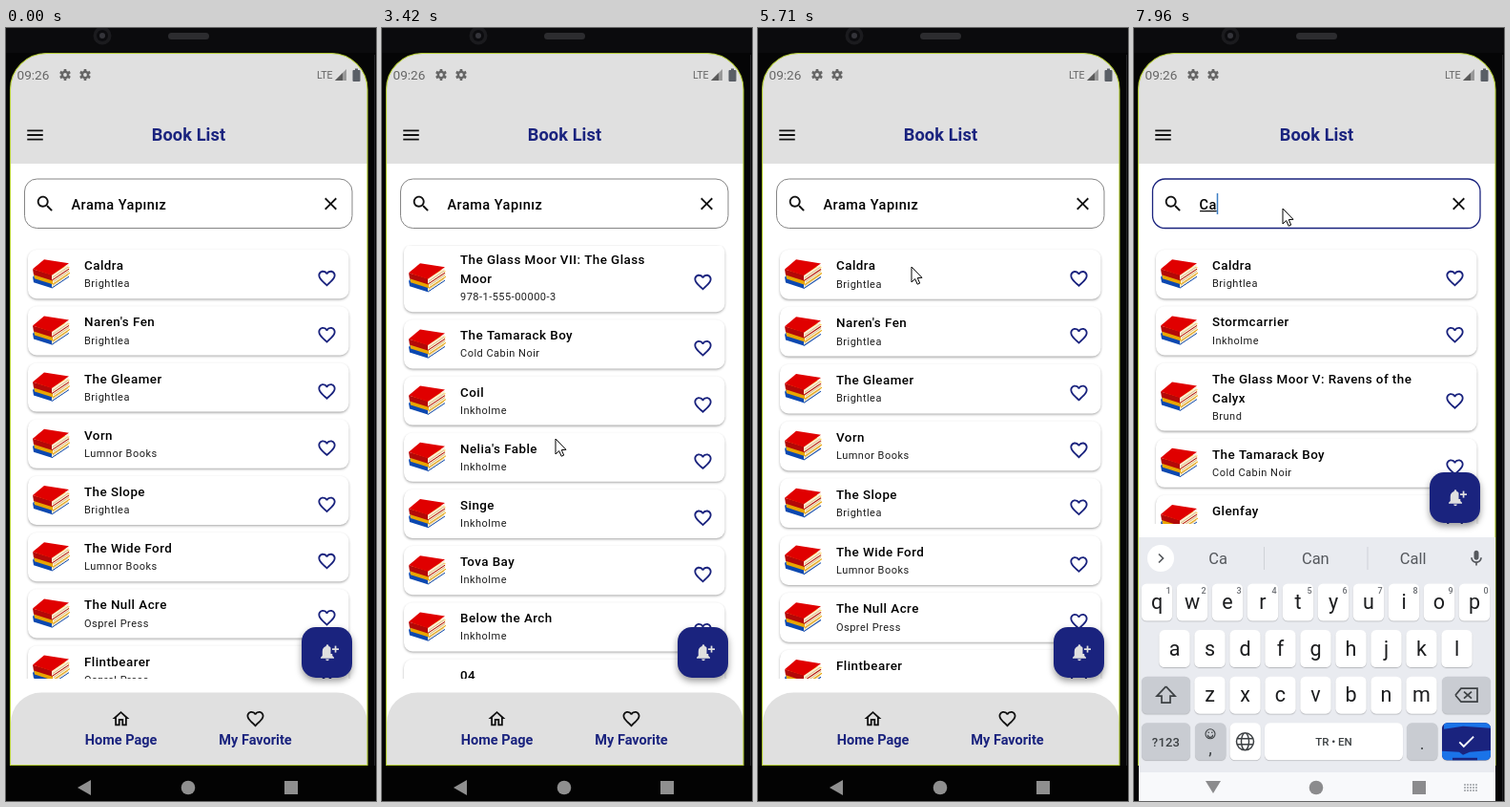
Recreate the animation shown at these times as an HTML page with a canvas. Size 388 by 809 pixels, loop 8 s.

```html
<!DOCTYPE html>
<html lang="en">
<head>
<meta charset="utf-8">
<title>Book List</title>
<style>
html, body { margin: 0; width: 100%; height: 100%; overflow: hidden; background: #000; }
canvas { display: block; width: 388px; height: 809px; }
</style>
</head>
<body>
<canvas id="stage"></canvas>
<script>
const W = 388, H = 809, LOOP = 8000;
const canvas = document.getElementById('stage');
const dpr = window.devicePixelRatio || 1;
canvas.width = W * dpr;
canvas.height = H * dpr;
const ctx = canvas.getContext('2d');

const NAVY = '#1a237e', GREY = '#e0e0e0', INK = '#111';
const FONT = 'Roboto, "Open Sans", sans-serif';
const LIST_TOP = 227.5, ROW = 59.2, LINE = 20;

const icons = {
  heart: 'M16.5 3c-1.74 0-3.41.81-4.5 2.09C10.91 3.81 9.24 3 7.5 3 4.42 3 2 5.42 2 8.5c0 3.78 3.4 6.86 8.55 11.54L12 21.35l1.45-1.32C18.6 15.36 22 12.28 22 8.5 22 5.42 19.58 3 16.5 3zm-4.4 15.55l-.1.1-.1-.1C7.14 14.24 4 11.39 4 8.5 4 6.5 5.5 5 7.5 5c1.54 0 3.04.99 3.57 2.36h1.87C13.46 5.99 14.96 5 16.5 5c2 0 3.5 1.5 3.5 3.5 0 2.89-3.14 5.74-7.9 10.05z',
  search: 'M15.5 14h-.79l-.28-.27C15.41 12.59 16 11.11 16 9.5 16 5.91 13.09 3 9.5 3S3 5.91 3 9.5 5.91 16 9.5 16c1.61 0 3.09-.59 4.23-1.57l.27.28v.79l5 4.99L20.49 19l-4.99-5zm-6 0C7.01 14 5 11.99 5 9.5S7.01 5 9.5 5 14 7.01 14 9.5 11.99 14 9.5 14z',
  clear: 'M19 6.41L17.59 5 12 10.59 6.41 5 5 6.41 10.59 12 5 17.59 6.41 19 12 13.41 17.59 19 19 17.59 13.41 12z',
  menu: 'M3 18h18v-2H3v2zm0-5h18v-2H3v2zm0-7v2h18V6H3z',
  home: 'M12 5.69l5 4.5V18h-2v-6H9v6H7v-7.81l5-4.5M12 3L2 12h3v8h6v-6h2v6h6v-8h3L12 3z',
  bell: 'M12 22c1.1 0 2-.9 2-2h-4c0 1.1.9 2 2 2zm6-6v-5c0-3.07-1.63-5.64-4.5-6.32V4c0-.83-.67-1.5-1.5-1.5s-1.5.67-1.5 1.5v.68C7.64 5.36 6 7.92 6 11v5l-2 2v1h16v-1l-2-2z',
  mic: 'M12 14c1.66 0 3-1.34 3-3V5c0-1.66-1.34-3-3-3S9 3.34 9 5v6c0 1.66 1.34 3 3 3zm5-3c0 2.76-2.24 5-5 5s-5-2.24-5-5H5c0 3.53 2.61 6.43 6 6.92V21h2v-3.08c3.39-.49 6-3.39 6-6.92h-2z',
  check: 'M9 16.17L4.83 12l-1.42 1.41L9 19 21 7l-1.41-1.41z'
};
for (const k in icons) icons[k] = new Path2D(icons[k]);

const publishers = {
  B: 'Brightlea', L: 'Lumnor Books', P: 'Osprel Press', O: 'Osprel', V: 'Varlow',
  G: 'Brund', N: 'Cold Cabin Noir', I: 'Inkholme', X: '978-1-555-00000-3'
};
// "publisher key + title", a slash breaks the line
const books = `BCaldra;BNaren's Fen;BThe Gleamer;LVorn;BThe Slope;LThe Wide Ford;PThe Null Acre;PFlintbearer;
LRainyard;OCobu;LThe Winding Lane;GThe Glass Moor: The/Lampbearer;OClothilde;BHen Orchardry;LCircle of the Hornets;
OThe Amulet Road;OThe Ears of the Heron;LFainter;OTi;GThe Glass Moor II: The Braiding of/the Seven;ODolour;
VThe Cellarhummers;OThe Grey Twin;BThe Slope Whole;GThe Glass Moor III: The Drift/Banks;OWishful Trades;
ONorbin's Wager;OOttilie Harrowby;OWakenight;OLily Saffron;OThe Blue Ferry;OForsaking;OThe Governors;
GThe Glass Moor IV: Tinker and/Frost;ISack of Stones;IThe Boy Who Followed Ned Arlow;IStormcarrier;IGrey Lodge;
IOut of a Sedan 5;GThe Glass Moor V: Ravens of the/Calyx;GThe Glass Moor VI: Hymn of/Rosalind;
XThe Glass Moor VII: The Glass/Moor;NThe Tamarack Boy;ICoil;INelia's Fable;ISinge;ITova Bay;IBelow the Arch;
I04/17/58;IThe Wind Beyond the Latch;NGlenfay;INurse Hush;IMr. Lorries;IRekindle;IKeepsakes;IEnd of Shift;
ISleeping Foxes;IThe Lodger Below;IHovering;IThe Bureau;NSooner;ITommy Winters`
  .split(';').map(s => s.trim())
  .map(s => ({ lines: s.slice(1).split('/'), pub: publishers[s[0]] }));

// Scroll bursts: start, steps, from, to, ease power
const STEP = 66;
const bursts = [
  [2000, 12, 0, 1260.5, 2],
  [3290, 9, 1260.5, 3097.5, 3],
  [4020, 2, 3097.5, 2400, 1],
  [4360, 2, 2400, 1627.7, 1],
  [4630, 11, 1627.7, 0, 2]
];
const stepAt = (t, start) => Math.floor((t - start + 8) / STEP);
const easeOut = (p, n) => 1 - Math.pow(1 - Math.min(1, p), n);

function scrollAt(t) {
  let y = 0;
  for (const [start, n, from, to, pow] of bursts)
    if (t >= start) y = from + (to - from) * easeOut((stepAt(t, start) + 1) / n, pow);
  return y;
}
function stretchAt(t) {
  return t < 5570 ? 1 : 1 + 0.0105 * Math.max(0, 1 - Math.abs(stepAt(t, 5570) - 2) / 6);
}
function keyboardTop(t) {
  return t < 6440 ? H : H - 276 * easeOut((stepAt(t, 6440) + 1) / 7, 3);
}

const pointer = [
  [1320, 221, 402], [1460, 140, 443], [1600, 183, 433], [3280, 183, 433], [3290, 182, 430],
  [4620, 182, 430], [4630, 182, 460], [5550, 182, 460], [5710, 161, 250], [5775, 161, 250],
  [6100, 151, 174], [6370, 156, 189]
];
function pointerAt(t) {
  if (t < pointer[0][0]) return null;
  for (let i = 1; i < pointer.length; i++) {
    const [t0, x0, y0] = pointer[i - 1], [t1, x1, y1] = pointer[i];
    if (t < t1) {
      const p = (t - t0) / (t1 - t0);
      return [x0 + (x1 - x0) * p, y0 + (y1 - y0) * p];
    }
  }
  return pointer[pointer.length - 1].slice(1);
}

function text(s, x, y, size, color, weight = 400, spacing = 0, align = 'left') {
  ctx.font = `${weight} ${size}px ${FONT}`;
  ctx.letterSpacing = spacing + 'px';
  ctx.textAlign = align;
  ctx.fillStyle = color;
  ctx.fillText(s, x, y);
}
function rect(x, y, w, h, color) {
  ctx.fillStyle = color;
  ctx.fillRect(x, y, w, h);
}
function round(x, y, w, h, r, color) {
  ctx.beginPath();
  ctx.roundRect(x, y, w, h, r);
  ctx.fillStyle = color;
  ctx.fill();
}
function circle(x, y, r, color) {
  ctx.beginPath();
  ctx.arc(x, y, r, 0, 7);
  ctx.fillStyle = color;
  ctx.fill();
}
function poly(points, color) {
  ctx.beginPath();
  points.forEach(([x, y]) => ctx.lineTo(x, y));
  ctx.closePath();
  ctx.fillStyle = color;
  ctx.fill();
}
function stroke(points, color, width = 1.5) {
  ctx.beginPath();
  points.forEach(([x, y]) => ctx.lineTo(x, y));
  ctx.strokeStyle = color;
  ctx.lineWidth = width;
  ctx.stroke();
}
function icon(name, x, y, size, color) {
  ctx.save();
  ctx.translate(x - size / 2, y - size / 2);
  ctx.scale(size / 24, size / 24);
  ctx.fillStyle = color;
  ctx.fill(icons[name]);
  ctx.restore();
}
function shadow(color, blur, dy) {
  ctx.shadowColor = color;
  ctx.shadowBlur = blur * dpr;
  ctx.shadowOffsetY = dy * dpr;
}
function clipTo(x, y, w, h, r = 0) {
  ctx.beginPath();
  ctx.roundRect(x, y, w, h, r);
  ctx.clip();
}

function gear(x, y) {
  ctx.strokeStyle = '#666';
  ctx.lineWidth = 2.6;
  for (let i = 0; i < 6; i++) {
    const a = Math.PI / 6 + i * Math.PI / 3;
    ctx.beginPath();
    ctx.moveTo(x + 3 * Math.cos(a), y + 3 * Math.sin(a));
    ctx.lineTo(x + 6 * Math.cos(a), y + 6 * Math.sin(a));
    ctx.stroke();
  }
  circle(x, y, 4.4, '#666');
  circle(x, y, 1.9, GREY);
}

function phone() {
  rect(0, 0, W, H, '#050506');
  rect(0, 0, W, 26, '#0b0b0d');
  circle(101, 8, 9.5, '#1b1b1e');
  circle(101, 8, 6, '#0c0c0f');
  circle(101, 8, 3, '#34343a');
  round(170, 5, 43, 7, 3.5, '#2c2c2f');
  rect(386, 28, 1, 781, '#252528');
}

function header() {
  rect(0, 0, W, 142, GREY);
  text('09:26', 11.5, 54, 13.6, '#666');
  gear(62, 49);
  gear(83, 49);
  text('LTE', 326, 53, 10.6, '#666');
  poly([[357, 43], [357, 55], [345, 55]], '#999');
  poly([[353, 47], [353, 55], [345, 55]], '#5a5a5a');
  round(363.5, 44, 8, 12, 1, '#5a5f66');
  rect(366, 42.5, 3, 2, '#5a5f66');
  icon('menu', 30.5, 112, 22, INK);
  text('Book List', 191.5, 118, 18.2, NAVY, 600, 0.1, 'center');
}

function searchBox(t, query) {
  const focused = t >= 6440;
  ctx.beginPath();
  ctx.roundRect(19.5, 158, 343.5, 51.5, 13);
  ctx.strokeStyle = focused ? NAVY : '#858585';
  ctx.lineWidth = focused ? 1.3 : 1;
  ctx.stroke();
  icon('search', 41, 184, 22, INK);
  icon('clear', 340.5, 184, 22, INK);
  text(query || 'Arama Yapınız', 68.5, 189.5, 14.5, '#000', 500, 0.46);
  if (!focused) return;
  const w = query ? ctx.measureText(query).width : 0;
  if (query && t >= 7630) rect(69, 191, w - 0.5, 1.2, '#000');
  rect(68.5 + w, 173, 1.5, 22, '#3d7fc4');
}

function volume(x, y, cover, spine) {
  poly([[x - 19, y - 3], [x + 1, y + 3], [x + 1, y + 9], [x - 18, y + 3]], spine);
  poly([[x + 1, y + 3], [x + 19, y - 8], [x + 18, y - 3], [x + 1, y + 9]], '#fbeed0');
  stroke([[x + 2, y + 6], [x + 18, y - 5]], '#c9a875', 0.7);
  poly([[x - 19, y - 3], [x - 7, y - 13], [x + 19, y - 9], [x + 1, y + 3.5]], cover);
  stroke([[x + 1, y + 9], [x + 19, y - 3]], spine, 1);
}
function stack(x, y) {
  volume(x, y + 6, '#1560d8', '#0c48b0');
  volume(x + 1, y + 2, '#ffc629', '#e9a500');
  volume(x, y - 2, '#e00000', '#b30808');
}

function card(book, y) {
  const extra = (book.lines.length - 1) * LINE;
  const h = 51.2 + extra, mid = y + h / 2;
  ctx.save();
  shadow('rgba(0,0,0,.32)', 2.5, 1.3);
  round(23, y, 336.5, h, 9, '#fff');
  ctx.restore();
  stack(47, mid - 0.4);
  book.lines.forEach((line, i) => text(line, 82, y + 21.2 + i * LINE, 13.4, '#000', 500, 0.45));
  text(book.pub, 82, y + 39.3 + extra, 11, '#1d1d1d', 400, 0.48);
  icon('heart', 336.5, mid + 4.4, 21.8, NAVY);
}

function list(t, query, bottom) {
  const q = query.toLowerCase();
  const rows = books.filter(b => (b.lines.join(' ') + '|' + b.pub).toLowerCase().includes(q));
  ctx.save();
  clipTo(5, LIST_TOP, 374, bottom - 14 - LIST_TOP);
  ctx.translate(0, LIST_TOP);
  ctx.scale(1, stretchAt(t));
  let y = 4.5 - scrollAt(t);
  for (const b of rows) {
    const h = ROW + (b.lines.length - 1) * LINE;
    if (y > -h && y < 460) card(b, y);
    y += h;
  }
  ctx.restore();
}

function fab(bottom) {
  const y = bottom - 68;
  ctx.save();
  shadow('rgba(0,0,0,.4)', 7, 3.5);
  round(310, y, 53, 53, 15, NAVY);
  ctx.restore();
  icon('bell', 337, y + 26.5, 21, GREY);
  rect(340.5, y + 18, 9, 10, NAVY);
  rect(342, y + 22.3, 7, 1.7, GREY);
  rect(344.7, y + 19.6, 1.7, 7, GREY);
}

function bottomBar() {
  round(5, 695.5, 374, 80, [32, 32, 0, 0], GREY);
  icon('home', 120.5, 723, 21.5, INK);
  icon('heart', 261.5, 723, 21.5, INK);
  text('Home Page', 120.5, 750, 14.5, NAVY, 700, 0, 'center');
  text('My Favorite', 261.5, 750, 14.5, NAVY, 700, 0, 'center');
}

function systemBar(open) {
  if (open) rect(5, 779, 374, 30, '#f8f9fb');
  else rect(0, 772, W, 37, '#030303');
  const c = open ? '#8b8b8d' : '#8f8f8f';
  if (open) poly([[75, 788], [91, 788], [83, 801]], c);
  else poly([[89, 787], [89, 803], [75, 795]], c);
  circle(191, 795, 7.3, c);
  rect(292, 788, 14, 14, c);
  if (!open) return;
  for (let i = 0; i < 15; i++) rect(346 + (i % 5) * 3, 791 + Math.floor(i / 5) * 3, 2, 2, '#b4b7bb');
}

function key(x, y, w, color) {
  ctx.save();
  shadow('rgba(0,0,0,.22)', 1, 0.8);
  round(x, y - 19.5, w, 39, 5.5, color);
  ctx.restore();
}

function toolbar(y, t) {
  const c = '#55585d', words = t >= 7630;
  circle(28, y, 14, '#fff');
  const d = words ? 1 : -1;
  stroke([[28 - 2 * d, y - 4.5], [28 + 2.5 * d, y], [28 - 2 * d, y + 4.5]], c, 1.7);
  icon('mic', 359, y, 20, c);
  if (words) {
    [t >= 7890 ? 'Ca' : 'C', 'Can', 'Call'].forEach((s, i) =>
      text(s, 88 + i * 102.3, y + 6, 16.5, c, 400, 0, 'center'));
    rect(136, y - 12, 1, 24, '#cfd2d7');
    rect(244.5, y - 12, 1, 24, '#cfd2d7');
    return;
  }
  icon('search', 77.5, y, 20, c);
  ctx.strokeStyle = c;
  ctx.lineWidth = 1.6;
  ctx.beginPath();
  ctx.roundRect(123.5, y - 7, 14.5, 14, 3);
  ctx.stroke();
  circle(128, y - 2, 1.1, c);
  circle(133.5, y - 2, 1.1, c);
  ctx.beginPath();
  ctx.arc(130.7, y + 0.5, 3.4, 0.2, 2.94);
  ctx.stroke();
  text('GIF', 184, y + 4.3, 12, c, 900, 0.8, 'center');
  ctx.strokeStyle = c;
  ctx.beginPath();
  ctx.roundRect(232, y - 7, 13, 15, 1.5);
  ctx.stroke();
  rect(235, y - 9, 7, 4, c);
  for (let i = 0; i < 3; i++) rect(235, y - 2 + i * 3, i < 2 ? 7 : 5, 1.2, c);
  rect(271.5, y - 11, 1, 22, '#cfd2d7');
  for (let i = 0; i < 3; i++) circle(299.5 + i * 6, y, 1.8, c);
}

function enterKey(y, settled) {
  key(323, y, 51, NAVY);
  ctx.save();
  clipTo(323, y - 19.5, 51, 39, 5.5);
  const blue = '#1a73e8';
  if (settled) {
    poly([[325, y - 20], [375, y - 20], [375, y - 14], [345, y - 16], [325, y - 13]], blue);
    poly([[323, y + 10], [341, y + 11], [345, y + 14], [352, y + 11], [375, y + 9], [375, y + 20], [323, y + 20]], blue);
    rect(334, y + 17, 26, 3, NAVY);
  } else {
    round(327, y + 4, 52, 22, 8, blue);
    rect(323, y + 4, 10, 9, NAVY);
  }
  ctx.restore();
  icon('check', 348.5, y, 22, '#fff');
}

function keyboard(top, t) {
  const upper = t >= 7230 && t < 7430;
  const dark = '#3c4043', special = '#c9ccd2';
  ctx.save();
  clipTo(5, top, 374, Math.max(0, 779 - top));
  rect(5, top, 374, 300, '#e9ebf0');
  toolbar(top + 22, t);
  const rowY = i => top + 68 + i * 48.6;
  [['qwertyuıop'.replace('ı', 'i'), 24], ['asdfghjkl', 42.5], ['zxcvbnm', 79.5]].forEach(([letters, x0], r) => {
    [...letters].forEach((ch, i) => {
      const x = x0 + i * 37, y = rowY(r);
      key(x - 16.2, y, 32.4, '#fff');
      text(upper ? ch.toUpperCase() : ch, x, y + 7, 21.5, '#1c1d1f', 400, 0, 'center');
      if (r === 0) text((i + 1) % 10, x + 12, y - 9, 9, '#6b6e73', 500, 0, 'center');
    });
  });
  const y3 = rowY(2), y4 = rowY(3);
  key(8, y3, 51, special);
  key(323, y3, 51, special);
  const arrow = [[33.5, y3 - 9], [43, y3 + 1], [38, y3 + 1], [38, y3 + 8], [29, y3 + 8], [29, y3 + 1], [24, y3 + 1], [33.5, y3 - 9]];
  if (upper) poly(arrow, dark);
  stroke(arrow, dark, 1.7);
  stroke([[337, y3], [343, y3 - 7], [360, y3 - 7], [360, y3 + 7], [343, y3 + 7], [337, y3]], dark, 1.7);
  stroke([[346, y3 - 3.5], [354, y3 + 3.5]], dark, 1.7);
  stroke([[354, y3 - 3.5], [346, y3 + 3.5]], dark, 1.7);

  key(8, y4, 51, special);
  text('?123', 33.5, y4 + 4.8, 13, dark, 500, 0.2, 'center');
  key(64, y4, 32.4, special);
  text(',', 80, y4 + 13, 18, dark, 400, 0, 'center');
  ctx.strokeStyle = dark;
  ctx.lineWidth = 1.1;
  ctx.beginPath();
  ctx.arc(80, y4 - 8, 5, 0, 7);
  ctx.moveTo(82.6, y4 - 7);
  ctx.arc(80, y4 - 7, 2.6, 0, Math.PI);
  ctx.stroke();
  circle(78.2, y4 - 9.6, 0.8, dark);
  circle(81.8, y4 - 9.6, 0.8, dark);
  key(100.5, y4, 32.4, '#fff');
  ctx.lineWidth = 1.5;
  ctx.beginPath();
  ctx.arc(116.5, y4, 9, 0, 7);
  ctx.moveTo(120.5, y4);
  ctx.ellipse(116.5, y4, 4, 9, 0, 0, 7);
  ctx.moveTo(108.5, y4 - 3);
  ctx.lineTo(124.5, y4 - 3);
  ctx.moveTo(108.5, y4 + 3);
  ctx.lineTo(124.5, y4 + 3);
  ctx.stroke();
  key(137, y4, 145, '#fff');
  text('TR • EN', 209.5, y4 + 4.2, 11.5, dark, 500, 0, 'center');
  key(286, y4, 32.4, special);
  text('.', 302, y4 + 8, 18, dark, 400, 0, 'center');
  enterKey(y4, t >= 6830);
  ctx.restore();
}

function cursor([x, y]) {
  const shape = [[0, 0], [0, 16], [3.7, 12.6], [6.2, 18.2], [8.7, 17.1], [6.3, 11.6], [11, 11.3], [0, 0]]
    .map(([a, b]) => [x + a, y + b]);
  poly(shape, '#fff');
  stroke(shape, '#000', 1);
}

function draw(t) {
  const query = t >= 7890 ? 'Ca' : t >= 7430 ? 'C' : '';
  const top = keyboardTop(t), open = t >= 6440;
  const bottom = Math.min(695, top);
  ctx.setTransform(dpr, 0, 0, dpr, 0, 0);
  phone();
  ctx.save();
  clipTo(4.5, 26.5, 374.5, 745, [38, 38, 0, 0]);
  rect(0, 0, W, H, '#fff');
  header();
  searchBox(t, query);
  list(t, query, bottom);
  bottomBar();
  fab(bottom);
  ctx.restore();
  ctx.beginPath();
  ctx.roundRect(4.5, 26.5, 374.5, 745, [38, 38, 0, 0]);
  ctx.strokeStyle = '#b4cc35';
  ctx.lineWidth = 1.1;
  ctx.stroke();
  if (open) keyboard(top, t);
  systemBar(open);
  const p = pointerAt(t);
  if (p) cursor(p);
}

const begin = performance.now();
function loop() {
  draw((performance.now() - begin) % LOOP);
  requestAnimationFrame(loop);
}
loop();
</script>
</body>
</html>
```
